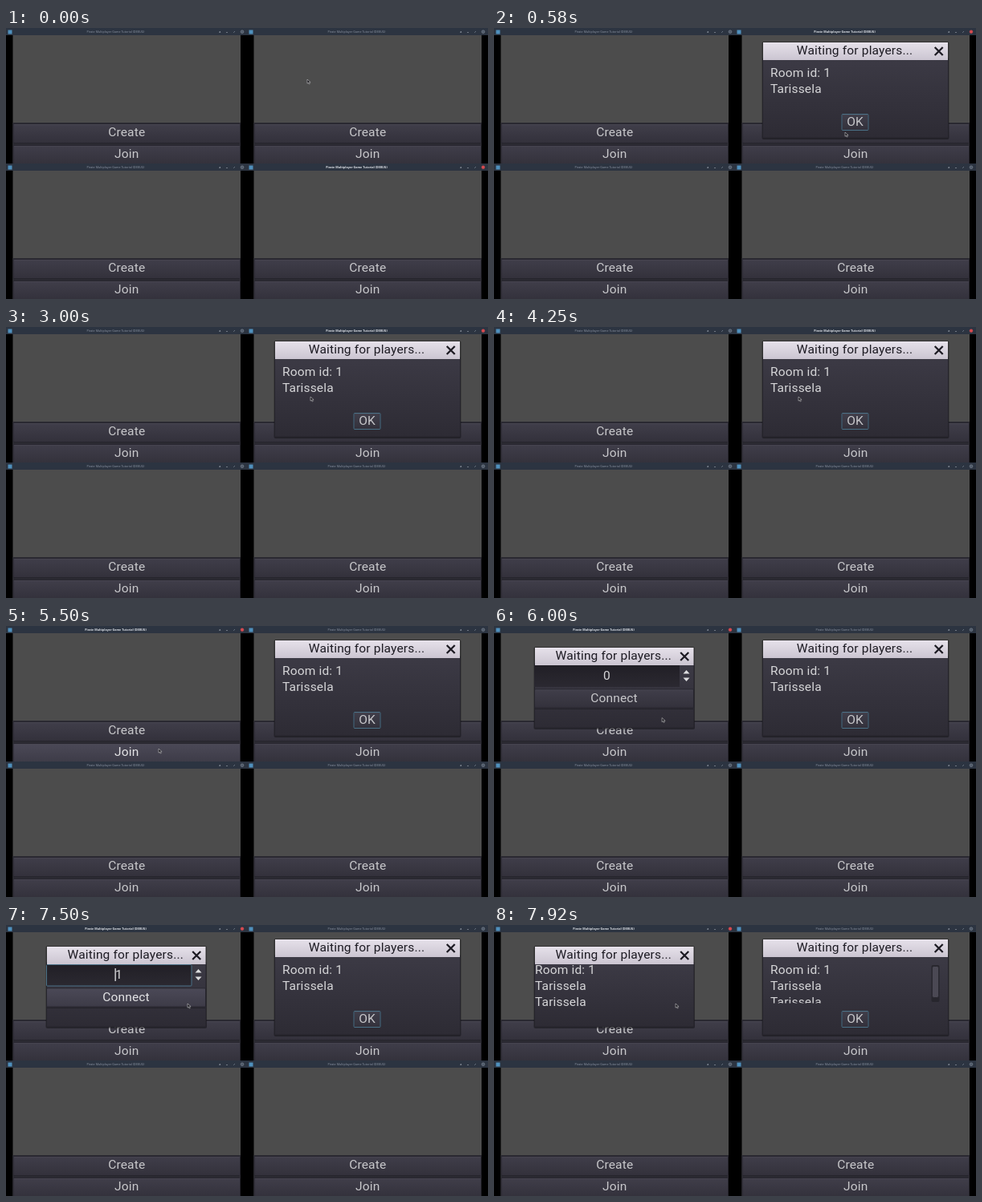
An HTML page that plays this animation: 600x338 px, repeating every 8 s.

```html
<!DOCTYPE html>
<html lang="en">
<head>
<meta charset="utf-8">
<title>Multiplayer lobby</title>
<style>
  html, body { margin: 0; width: 100%; height: 100%; overflow: hidden; background: #000; }
  svg { display: block; width: 100vw; height: 100vh; }
  text { font: 15.5px Roboto, "Noto Sans", sans-serif; letter-spacing: .17px; fill: #d6d6d8; }
  .mid { text-anchor: middle; }
  .heading { fill: #1d1b23; }
  .caption { font: 3.7px "Noto Sans", sans-serif; letter-spacing: 0; fill: #8a92a0; }
  .active .caption { fill: #dfe3e9; font-weight: 600; }
  .close { fill: #505a69; stroke: #87909d; stroke-width: .5; }
  .active .close { fill: #d94b50; stroke: #d94b50; }
  .button { fill: url(#button); stroke: #26252d; }
  .button.hover { fill: url(#hover); }
  .label { fill: #c8c8cb; }
  .hover ~ .label { fill: #e4e4e6; }
  .shine { stroke: #4b4955; stroke-width: .7; }
  .focus { fill: none; stroke: #4a7187; }
</style>
</head>
<body>
<svg id="stage" viewBox="0 0 600 338">
  <defs>
    <linearGradient id="button" x2="0" y2="1"><stop stop-color="#403e4a"/><stop offset="1" stop-color="#33313b"/></linearGradient>
    <linearGradient id="hover" x2="0" y2="1"><stop stop-color="#4b4957"/><stop offset="1" stop-color="#3d3b47"/></linearGradient>
    <linearGradient id="panel" x2="0" y2="1"><stop stop-color="#3c3a45"/><stop offset="1" stop-color="#2d2b34"/></linearGradient>
    <linearGradient id="heading" x2="0" y2="1"><stop stop-color="#e6e1ea"/><stop offset="1" stop-color="#cbc5d1"/></linearGradient>
    <linearGradient id="field" x2="0" y2="1"><stop stop-color="#211f26"/><stop offset="1" stop-color="#2b2931"/></linearGradient>
    <clipPath id="screen"><rect width="300" height="169"/></clipPath>
    <clipPath id="list"><rect x="340" y="42" width="205" height="55.5"/></clipPath>
  </defs>
</svg>
<script>
const LOOP = 8000, STEP = 1000 / 12;
const PLAYER = "Tarissela";
const stage = document.getElementById("stage");

const rect = (x, y, w, h, attrs) =>
  `<rect x="${x}" y="${y}" width="${w}" height="${h}" ${attrs}/>`;
const text = (x, y, label, cls = "") => `<text x="${x}" y="${y}" class="${cls}">${label}</text>`;

function button(x, y, w, h, label, baseline, id = "") {
  return `<g>${rect(x + .5, y + .5, w - 1, h - 1, `class="button" rx="1" id="${id}"`)}
    <path class="shine" d="M${x + 1.5} ${y + 1.4}h${w - 3}"/>
    ${text(x + w / 2, baseline, label, "mid label")}</g>`;
}

function appWindow(id, x, y) {
  return `<g id="${id}" transform="translate(${x} ${y})" clip-path="url(#screen)">
    ${rect(0, 0, 300, 169, 'fill="#000"')}
    ${rect(0, 0, 300, 9, 'fill="#2c3441"')}
    ${rect(2.5, 2.5, 5, 5, 'fill="#4f90bd"')}
    ${text(136.5, 5.7, "Pirate Multiplayer Game Tutorial (DEBUG)", "mid caption")}
    <path d="M265 5.6l1.2-1.5 1.2 1.5zM274 4.9h2v.7h-2z" fill="#b5bcc6"/>
    <path d="M283.2 5.8l1.8-1.8" stroke="#858e9b" stroke-width=".7"/>
    <circle class="close" cx="294" cy="4.7" r="1.9"/>
    ${rect(8.5, 9, 283.5, 160, 'fill="#4c4c4c"')}
    ${rect(8.5, 118, 283.5, 51, 'fill="#2b2a32"')}
    ${button(8.5, 119, 283.5, 25, "Create", 135, id + "Create")}
    ${button(8.5, 146, 283.5, 25, "Join", 161.5, id + "Join")}
  </g>`;
}

function dialog(id, x, y, w, h, content) {
  const cx = x + w - 11.3, cy = y + 11;
  return `<g id="${id}">
    ${rect(x - 1.5, y - 1, w + 3, h + 3, 'fill="#000" opacity=".35" rx="2"')}
    ${rect(x - .5, y + 20, w + 1, h - 20, 'fill="url(#panel)" stroke="#24232a"')}
    ${rect(x, y, w, 22, 'fill="url(#heading)"')}
    ${text(x + w / 2 - 1, y + 15, "Waiting for players...", "mid heading")}
    <path d="M${cx - 5} ${cy - 5}l10 10m0-10l-10 10" stroke="#1d1b23" stroke-width="2.3"/>
    ${content}</g>`;
}

const host = dialog("host", 335, 18, 230, 119,
  `<g clip-path="url(#list)">${text(344, 61, "Room id: 1")}${text(344, 81, PLAYER)}
   <g id="guest">${text(344, 101, PLAYER)}</g></g>
   <g id="scroll">${rect(544.5, 50, 10, 46, 'rx="2" fill="#27262d"')}
   ${rect(545.5, 51.5, 8, 39, 'rx="2" fill="#4b4954" stroke="#2a2931"')}</g>
   ${button(432.5, 107, 34, 21, "OK", 122)}
   ${rect(433, 107.5, 33, 20, 'class="focus" rx="1"')}`);

const join = dialog("join", 51, 27, 197.5, 100,
  `<g id="form">${rect(50, 49, 181, 27, 'fill="url(#field)"')}
   <text id="value" class="mid" x="140.5" y="67"></text>
   <g id="caret">${rect(50.5, 49.5, 180.5, 26.5, 'class="focus" rx="1"')}
   ${rect(135.5, 54, 1.3, 16, 'fill="#e4e4e6"')}</g>
   <path d="M235.5 59.5l4-4.5 4 4.5zM235.5 64.5l4 4.5 4-4.5z" fill="#dedee0"/>
   ${button(50, 78.5, 199, 24, "Connect", 95, "connect")}
   <path d="M51 103.5h197" stroke="#24232a"/></g>
   <g id="room">${text(51, 61, "Room id: 1")}${text(51, 81, PLAYER)}${text(51, 101, PLAYER)}</g>`);

stage.insertAdjacentHTML("beforeend",
  appWindow("nw", 0, 0) + appWindow("ne", 300, 0) +
  appWindow("sw", 0, 169) + appWindow("se", 300, 169) + host + join +
  `<path id="cursor" d="M0 0V5.2L1.3 4.1 2.2 6 3.2 5.5 2.4 3.7H4.1Z"
    fill="#17161b" stroke="#c4c4c6" stroke-width=".6"/>`);

const $ = id => document.getElementById(id);
const show = (id, on) => $(id).style.display = on ? "" : "none";
const mark = (id, cls, on) => $(id).classList.toggle(cls, on);

// Pointer stops: time, x, y
const path = [
  [0, 375, 64], [80, 375, 64], [330, 437, 130], [1000, 437, 130], [1250, 437, 126],
  [1800, 437, 126], [2330, 379, 87], [4660, 379, 87], [5330, 190, 153],
  [5750, 190, 153], [6330, 238, 56], [6580, 238, 56], [6830, 237, 64],
  [7080, 237, 64], [7330, 226, 98], [LOOP, 226, 98]
];

function pointerAt(t) {
  const i = Math.max(1, path.findIndex(stop => stop[0] > t));
  const [t0, x0, y0] = path[i - 1], [t1, x1, y1] = path[i];
  const u = (t - t0) / (t1 - t0), k = u * u * (3 - 2 * u);
  return [x0 + (x1 - x0) * k, y0 + (y1 - y0) * k];
}

function draw(time) {
  const t = Math.floor((time % LOOP + 4) / STEP) * STEP;
  const [x, y] = pointerAt(Math.min(t, LOOP - 1));
  const focus = t < 330 ? "se" : t < 5490 ? "ne" : "nw";
  for (const id of ["nw", "ne", "sw", "se"]) mark(id, "active", id === focus);

  const hosting = t > 410, joining = t > 5660, connected = t > 7570;
  show("host", hosting);
  show("join", joining);
  show("form", !connected);
  show("room", connected);
  show("guest", connected);
  show("scroll", connected);
  show("caret", t > 6490);
  $("value").textContent = t > 6490 ? "1" : "0";

  mark("neCreate", "hover", !hosting && y > 119);
  mark("nwJoin", "hover", !joining && x < 291 && y > 146);
  mark("connect", "hover", joining && x < 249 && y > 79 && y < 102);
  $("cursor").setAttribute("transform", `translate(${x} ${y})`);
}

function tick() {
  draw(performance.now());
  requestAnimationFrame(tick);
}
tick();
</script>
</body>
</html>
```
